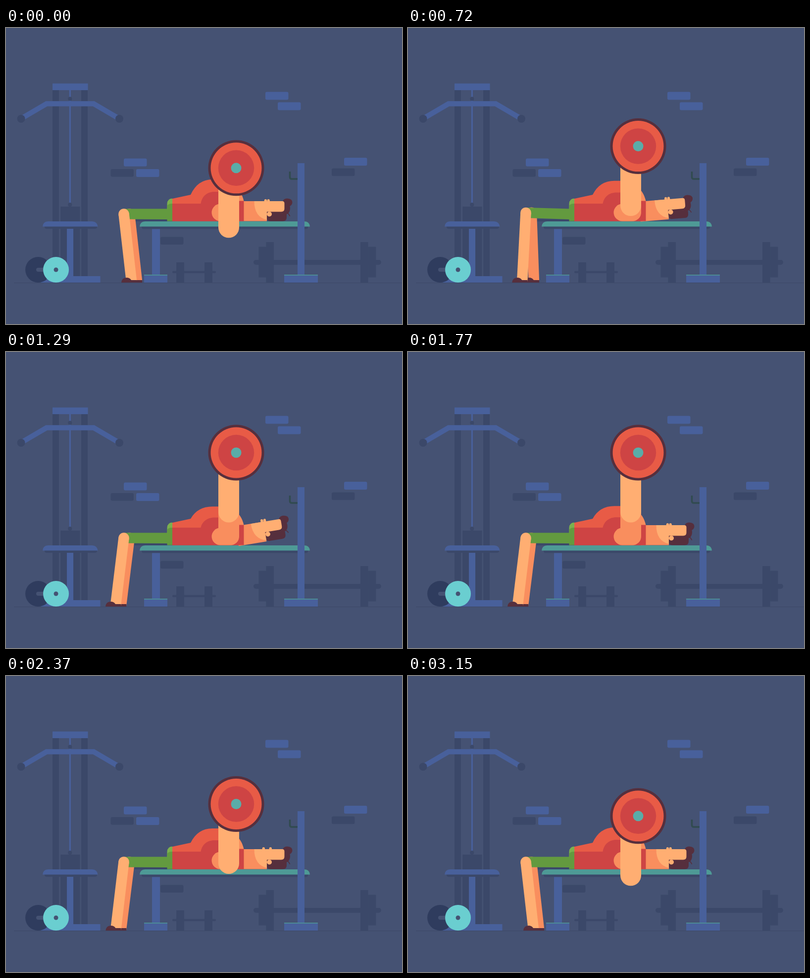
Write an HTML page with a canvas that moves like this. It is 800 by 600 pixels and loops after 3210 ms.

```html
<!DOCTYPE html>
<html lang="en">
<head>
<meta charset="utf-8">
<title>Bench press</title>
<style>
html, body { margin: 0; width: 100%; height: 100%; overflow: hidden; background: #455273; }
canvas { display: block; }
</style>
</head>
<body>
<canvas id="stage" width="800" height="600"></canvas>
<script>
const ctx = document.getElementById('stage').getContext('2d');
const LOOP = 3210, STEP = 30;
const C = {
  wall: '#455273', dark: '#3b4869', navy: '#2f3c5e', blue: '#48609b',
  teal: '#4e9a96', aqua: '#6aced0', hub: '#5aaca8', hook: '#314b50',
  skin: '#ffae72', shade: '#f98e5e', red: '#ce4444', coral: '#e85b46',
  maroon: '#562f3d', green: '#639a3f', lime: '#7bb04e'
};

// Keyframes are [time, value] pairs with a smooth ease between them.
function track(t, ...keys) {
  if (t <= keys[0][0]) return keys[0][1];
  for (let i = 1; i < keys.length; i++) {
    const [t0, a] = keys[i - 1], [t1, b] = keys[i];
    if (t < t1) {
      const u = (t - t0) / (t1 - t0);
      return a + (b - a) * u * u * (3 - 2 * u);
    }
  }
  return keys[keys.length - 1][1];
}

function box(color, x, y, w, h, r = 0) {
  ctx.fillStyle = color;
  ctx.beginPath();
  ctx.roundRect(x, y, w, h, r);
  ctx.fill();
}

function disc(color, x, y, r) {
  ctx.fillStyle = color;
  ctx.beginPath();
  ctx.arc(x, y, r, 0, Math.PI * 2);
  ctx.fill();
}

function shape(color, d) {
  ctx.fillStyle = color;
  ctx.fill(new Path2D(d));
}

function line(color, width, d, cap = 'butt') {
  ctx.strokeStyle = color;
  ctx.lineWidth = width;
  ctx.lineCap = cap;
  ctx.stroke(new Path2D(d));
}

function drawRoom() {
  box(C.wall, 0, 0, 800, 600);
  for (const [x, y] of [[524, 129.5], [549, 150.5], [238, 264.5], [263, 286], [683, 263]])
    box(C.blue, x, y, 46.5, 16, 3);
  for (const [x, y] of [[211.5, 286], [658, 284.5], [312, 423.5]])
    box(C.dark, x, y, 46.5, 15.5, 3);
  box('#3e4a6a', 16, 516, 784, 1.2);
}

function drawWeights() {
  box(C.dark, 336, 492.5, 88, 4.5, 2);
  for (const x of [344, 401]) box(C.dark, x, 475, 16, 41);
  box(C.dark, 500, 470, 258, 10, 5);
  for (const x of [525.5, 716]) box(C.dark, x, 434, 15.5, 82);
  for (const x of [510.5, 731.5]) box(C.dark, x, 443.5, 16, 62);
}

function drawMachine() {
  for (const x of [94, 152]) box(C.dark, x, 126, 13, 377);
  box(C.dark, 110, 362, 39.5, 141);
  box(C.blue, 94, 112.5, 71.5, 13.5);
  box(C.blue, 127.7, 126, 3.3, 230);
  disc(C.dark, 129.3, 143.5, 4);
  disc(C.dark, 129.3, 358, 4);
  line(C.blue, 10.5, 'M30 184L82 153.5H177L229 184');
  disc(C.dark, 30.5, 184, 8);
  disc(C.dark, 229, 184, 8);
  box(C.dark, 78, 402, 106, 5, [0, 0, 4, 4]);
  shape(C.blue, 'M74 402.5Q75 392 85 392H174Q184 392 185.5 402.5Z');
  box(C.blue, 123, 407, 13, 97);
  box(C.blue, 70, 503, 120.5, 13);
  disc(C.navy, 65, 490, 26);
  box(C.wall, 61, 486, 20, 8, 4);
  disc(C.aqua, 101, 490, 26);
  disc(C.wall, 101, 490, 4.5);
}

function drawBench() {
  box(C.dark, 274, 402, 336, 5.5, [0, 0, 4, 4]);
  shape(C.teal, 'M270 402.5Q271 392 281 392H603Q613 392 614 402.5Z');
  box(C.blue, 295, 407.5, 16, 93);
  box(C.blue, 279, 500, 47, 16);
  box(C.teal, 279, 500, 47, 1.5);
}

function drawRack() {
  line(C.hook, 3.5, 'M573.5 291V302Q573.5 306 577.5 306H589');
  box(C.blue, 589, 274, 14, 227);
  box(C.blue, 562, 500, 68, 16);
  box(C.teal, 562, 500, 68, 1.5);
}

function drawShin(color, knee, kneeY, ankle) {
  line(color, 21.5, `M${knee} ${kneeY}L${ankle} 513`);
  disc(color, knee, kneeY, 10.75);
}

function drawShoe(ankle) {
  const left = ankle - 20.5;
  shape(C.maroon, `M${left} 516Q${left + 1} 506 ${left + 10.5} 506Q${left + 17} 506 ${left + 20} 511H${ankle + 10.7}V516Z`);
}

function drawLegs(front, rear) {
  // front and rear run from 0 (foot forward) to 1 (foot tucked under the knee).
  const lift = p => 377 - 3.3 * Math.sin(Math.PI * p);
  const frontAnkle = 253.5 - 32 * front, rearAnkle = 264.5 - 32 * rear;
  const frontKnee = lift(front), rearKnee = lift(rear);
  ctx.save();
  ctx.beginPath();
  ctx.rect(150, 340, 200, 176);
  ctx.clip();
  box(C.dark, 258, 387.5, 68, 4.5);
  drawShin(C.shade, 249.3, rearKnee, rearAnkle);
  drawShoe(rearAnkle);
  const top = frontKnee - 10.5;
  shape(C.green, `M240 ${top}L327 366.5V388L240 ${top + 21}Z`);
  drawShin(C.skin, 238, frontKnee, frontAnkle);
  drawShoe(frontAnkle);
  ctx.restore();
}

function drawHead(angle, spread) {
  ctx.save();
  ctx.translate(481, 391.5);
  ctx.rotate(-angle * Math.PI / 180);
  ctx.translate(-481, -391.5);
  shape(C.maroon, 'M559 352Q560 345.5 568 345.5Q578.5 346 578.5 353.5Q578 359 573.5 361Q575 369 571.5 374Q570 377 567 377V384Q567 391.5 559 391.5H534Q526.5 391.5 526.5 384V372H559Z');
  line(C.maroon, 1.5, 'M568 375Q572 377 573.5 381.5');
  box(C.shade, 470, 351, 57, 40.5);
  shape(C.skin, 'M501.5 351H558Q562.5 351 562.5 355.5V366Q562.5 372.5 556 372.5H527V389Q501.5 383 501.5 351Z');
  disc(C.skin, 532, 377.2, 5);
  const tall = 3.5 + angle * 0.15;
  for (const side of [-1, 1])
    box(C.skin, 527.3 + side * spread - 2.6, 350.5 - tall, 5.2, tall + 3, 2.6);
  ctx.restore();
}

function drawTorso(top) {
  const inner = 332 + (top - 307) * 0.55;
  shape(C.lime, 'M325.5 368V356Q326 346 336 345.5V368Z');
  shape(C.green, 'M325.5 391.5V361Q327 356 336 356V391.5Z');
  shape(C.coral, `M336 346L373 338Q387 ${top} 417 ${top}H440Q463 ${top + 2} 473 334V391.5H336Z`);
  shape(C.shade, 'M460 320Q476 330 480.5 351H460Z');
  shape(C.red, `M336 356H393.5C396 ${inner + 9} 406 ${inner} 421 ${inner}H450V350.5H480.5V391.5H336Z`);
}

function drawArm(barY) {
  const elbow = barY + 120.5;
  box(C.shade, 415.5, 356.5, 55.5, 35, 17.5);
  if (elbow < 374) box(C.shade, 429, elbow, 42, 374 - elbow);
  box(C.skin, 429, barY, 42, 141.5, [0, 0, 21, 21]);
}

function drawPlate(y) {
  disc(C.maroon, 465, y, 56.5);
  disc(C.coral, 465, y, 51.5);
  disc(C.red, 465, y, 36.2);
  disc(C.hub, 465, y, 10.5);
}

function draw(t) {
  const barY = track(t, [210, 283.8], [486, 289.2], [926, 198.6], [987, 204.5],
    [1080, 204], [1860, 204], [2665, 283.8]);
  const chest = track(t, [210, 307], [490, 304], [900, 313.6], [1290, 313.3],
    [1770, 312.3], [2700, 307.5], [3150, 307]);
  const tilt = track(t, [540, 0], [900, 9.5], [1270, 9.5], [1740, 0]);
  const spread = track(t, [1830, 2.9], [2130, 7], [2760, 7], [3120, 2.9]);
  const front = track(t, [520, 0], [830, 1], [2340, 1], [2820, 0]);
  const rear = track(t, [600, 0], [920, 1], [2655, 1], [3150, 0]);

  drawRoom();
  drawWeights();
  drawMachine();
  drawBench();
  drawLegs(front, rear);
  drawHead(tilt, spread);
  drawTorso(chest);
  drawRack();
  drawArm(barY);
  drawPlate(barY);
}

function tick() {
  const t = performance.now() % LOOP;
  draw(Math.floor(t / STEP) * STEP);
  requestAnimationFrame(tick);
}
tick();
</script>
</body>
</html>
```
